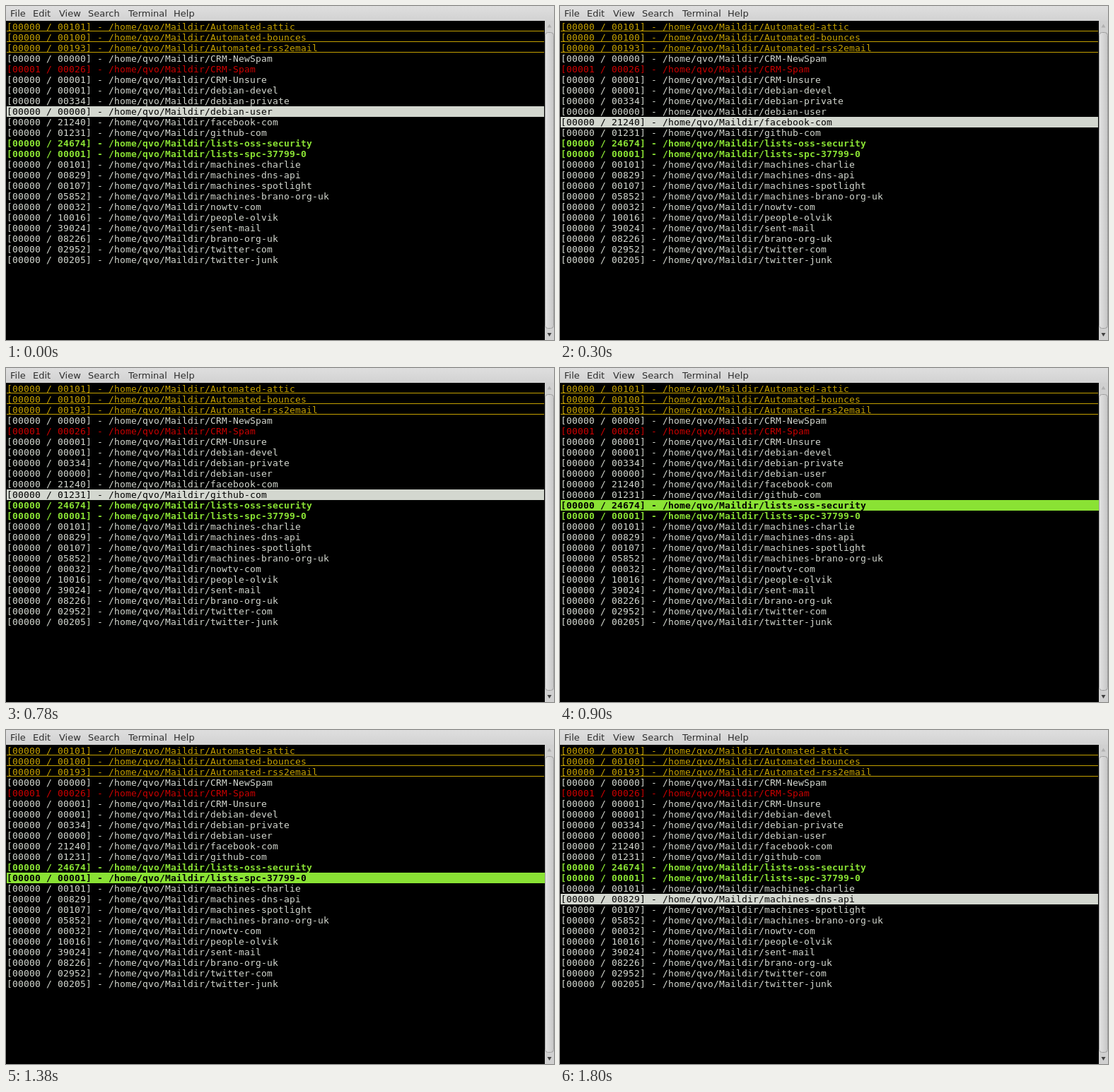
Animation, 775 px wide and 473 px high, one loop 2100 ms. Source, as an HTML page:

```html
<!DOCTYPE html>
<html lang="en">
<head>
<meta charset="utf-8">
<title>Mail folders</title>
<style>
html, body { margin: 0; width: 100%; height: 100%; overflow: hidden; background: #000; }
#menu { position: absolute; left: 0; top: 0; width: 775px; height: 21px;
  background: linear-gradient(#dedede, #d2d2d2); color: #2e2e2e;
  font: 13px/21px "DejaVu Sans", sans-serif; }
#menu span { position: absolute; top: 0; }
/* Terminal cells are 8 by 15 pixels. */
#list { position: absolute; left: 1px; top: 22px; width: 761px;
  font: 13px/15px "DejaVu Sans Mono", monospace; letter-spacing: calc(8px - 1ch); }
#list div { --ink: #d3d7cf; box-sizing: border-box; width: 760px; height: 15px;
  color: var(--ink); white-space: pre; }
#list .auto { --ink: #c4a000; box-shadow: inset 0 -1px #000, inset 0 -2px var(--ink); }
#list .spam { --ink: #c00; }
#list .list { --ink: #8ae234; width: 761px; font-weight: bold; }
#list .on { background: var(--ink); color: #000; }
svg { position: absolute; left: 762px; top: 21px; }
</style>
</head>
<body>
<div id="menu"></div>
<div id="list"></div>
<svg width="13" height="452">
  <defs>
    <linearGradient id="thumb">
      <stop offset="0" stop-color="#e4e4e4"/>
      <stop offset="1" stop-color="#c6c6c6"/>
    </linearGradient>
  </defs>
  <rect width="13" height="452" fill="#d0d0d0"/>
  <rect x=".5" y="16.5" width="12" height="419" rx="4" fill="url(#thumb)" stroke="#a0a0a0"/>
  <path d="M3.5 9.5h6l-3-5z" fill="#b0b0b0"/>
  <path d="M3.5 442h6l-3 5z" fill="#404040"/>
</svg>
<script>
const menu = { File: 6, Edit: 38, View: 75, Search: 116, Terminal: 173, Help: 237 };
const folders = `101 Automated-attic
100 Automated-bounces
193 Automated-rss2email
0 CRM-NewSpam
26 CRM-Spam
1 CRM-Unsure
1 debian-devel
334 debian-private
0 debian-user
21240 facebook-com
1231 github-com
24674 lists-oss-security
1 lists-spc-37799-0
101 machines-charlie
829 machines-dns-api
107 machines-spotlight
5852 machines-brano-org-uk
32 nowtv-com
10016 people-olvik
39024 sent-mail
8226 brano-org-uk
2952 twitter-com
205 twitter-junk`;

const add = (parent, tag, text) => {
  const el = document.createElement(tag);
  el.textContent = text;
  return document.getElementById(parent).appendChild(el);
};
const pad = n => String(n).padStart(5, "0");
const kind = name =>
  name.startsWith("Automated") ? "auto" :
  name === "CRM-Spam" ? "spam" :
  name.startsWith("lists") ? "list" : "";

for (const [label, x] of Object.entries(menu)) add("menu", "span", label).style.left = x + "px";

const rows = folders.split("\n").map(line => {
  const [total, name] = line.split(" ");
  const type = kind(name);
  const unread = type === "spam" ? 1 : 0;
  const row = add("list", "div", `[${pad(unread)} / ${pad(total)}] - /home/qvo/Maildir/${name}`);
  if (type) row.classList.add(type);
  return row;
});

// The selection steps down seven folders, 300 ms each, then starts over.
const FIRST = 8, STEP = 300, COUNT = 7;
function draw(now) {
  const selected = FIRST + Math.floor(now / STEP) % COUNT;
  rows.forEach((row, i) => row.classList.toggle("on", i === selected));
  requestAnimationFrame(() => draw(performance.now()));
}
draw(performance.now());
</script>
</body>
</html>
```
